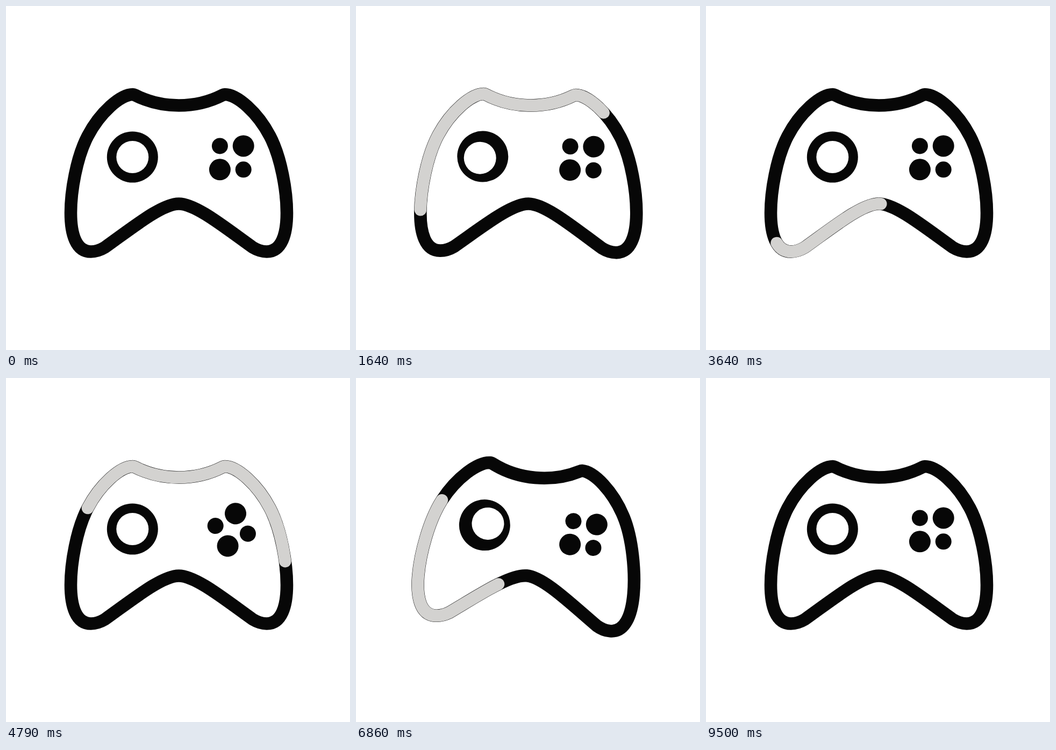
These frames come from a looping animation (640 by 640 pixels, 9570 ms). An HTML page:

```html
<!DOCTYPE html>
<html lang="en">
<head>
<meta charset="utf-8">
<title>Game controller</title>
<style>
  html, body { margin: 0; width: 100%; height: 100%; overflow: hidden; background: #fff; }
  svg { display: block; width: 100%; height: 100%; }
  .line { fill: none; stroke: #070707; stroke-width: 23.6; stroke-linejoin: round; }
  .glow { fill: none; stroke: #d3d2d0; stroke-width: 22.6; stroke-linecap: round; stroke-linejoin: round; }
  .ink { fill: #070707; }
</style>
</head>
<body>
<svg viewBox="0 0 640 640">
  <defs>
    <path id="shell" pathLength="1" d="M321.5 368 C290 368 236 412 184 449
      C174 455 166 457 158 457 C130 457 120.5 424 120.5 385
      C120.5 345 131 282 152 242 C175 198 213 164.5 236 164.5
      C238 164.5 239 165.2 240.5 166 C265 178.5 292 185 321.5 185
      C351 185 378 178.5 402.5 166 C404 165.2 405 164.5 407 164.5
      C430 164.5 468 198 491 242 C512 282 522.5 345 522.5 385
      C522.5 424 513 457 485 457 C477 457 469 455 459 449
      C407 412 353 368 321.5 368 Z"/>
  </defs>
  <g id="body">
    <use href="#shell" class="line"/>
    <use href="#shell" class="glow"/>
    <use href="#shell" class="glow"/>
    <use href="#shell" class="glow"/>
    <circle class="ink" cx="235.3" cy="281" r="47.5"/>
    <circle id="stick" cx="235.3" cy="281" r="30" fill="#fff"/>
    <g id="buttons" class="ink">
      <circle cx="397.9" cy="260.4" r="15"/>
      <circle cx="441.7" cy="260.4" r="20"/>
      <circle cx="397.9" cy="304.3" r="20"/>
      <circle cx="441.7" cy="304.3" r="15"/>
    </g>
  </g>
</svg>
<script>
  const LOOP = 9570, FPS = 14;
  const body = document.getElementById('body');
  const stick = document.getElementById('stick');
  const buttons = document.getElementById('buttons');
  const glows = document.querySelectorAll('.glow');

  const passes = [0, 2.89, 5.755];
  const spins = [0.89, 4.61, 6.25];
  const tilt = [[0.9, 0], [1.4, 15], [1.9, -15], [2.22, 0],
                [6.27, 0], [6.61, 15], [7.25, -15], [7.6, 0]];
  const stickX = [[0, 0], [0.7, 7.5], [0.9, 7.5], [1.9, -7.5], [2.28, -7.5], [2.7, 0]];
  const stickY = [[0, 0], [0.7, -4], [0.9, -4], [1.9, 4], [2.17, 4], [2.28, 0]];

  // Eased progress of a move that begins at start and lasts span seconds
  function ease(t, start, span) {
    const u = Math.min(1, Math.max(0, (t - start) / span));
    return u * u * (3 - 2 * u);
  }

  // Eased value along [time, value] keys
  function track(keys, t) {
    let value = keys[0][1];
    for (let i = 1; i < keys.length; i++) {
      const [t0, v0] = keys[i - 1], [t1, v1] = keys[i];
      value += (v1 - v0) * ease(t, t0, t1 - t0);
    }
    return value;
  }

  function draw(t) {
    passes.forEach((start, i) => {
      const head = ease(t, start, 2.83);
      const tail = ease(t, start + 0.72, 3.02);
      const style = glows[i].style;
      style.display = head - tail > 1e-5 ? '' : 'none';
      style.strokeDasharray = `${head - tail} 2`;
      style.strokeDashoffset = -tail;
    });
    body.setAttribute('transform', `rotate(${track(tilt, t)} 321.5 323)`);
    const turn = spins.reduce((sum, start) => sum - 180 * ease(t, start, 0.66), 0);
    buttons.setAttribute('transform', `rotate(${turn} 419.8 282.35)`);
    const s = t < passes[2] ? t : t - passes[2];
    stick.setAttribute('transform', `translate(${track(stickX, s)} ${track(stickY, s)})`);
  }

  function tick() {
    const step = Math.floor((performance.now() % LOOP) * FPS / 1000 + 0.1);
    draw(step / FPS);
    requestAnimationFrame(tick);
  }
  tick();
</script>
</body>
</html>
```
